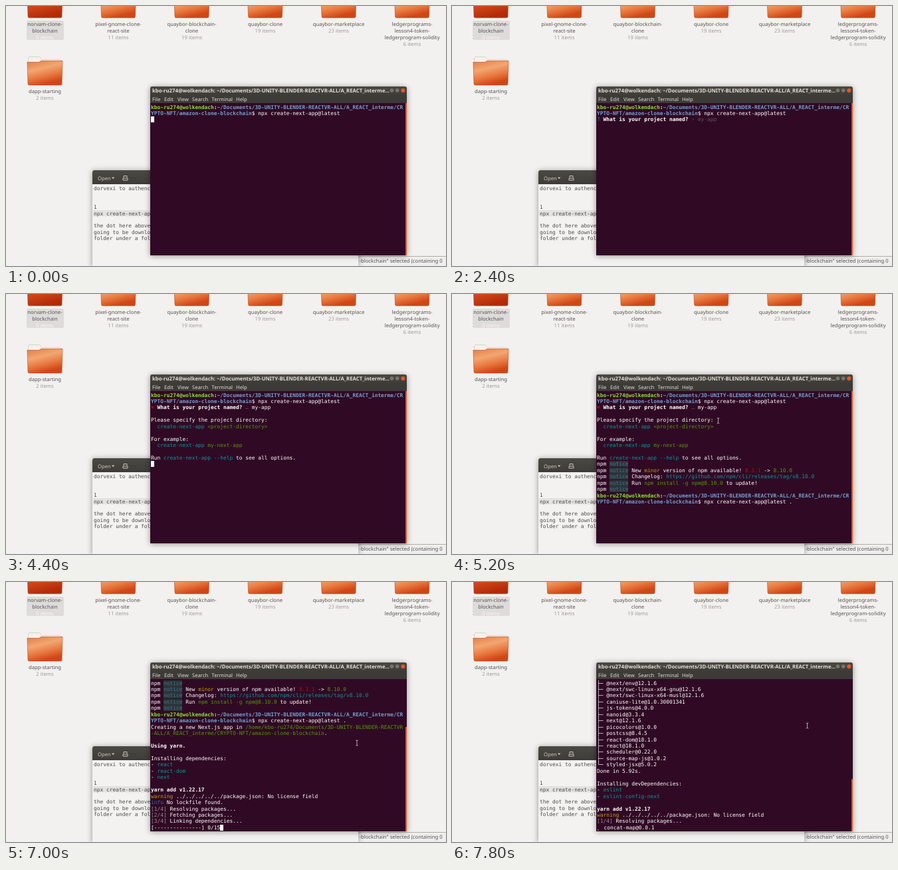
These frames come from a looping animation (662 by 391 pixels, 8000 ms). An HTML page:

```html
<!DOCTYPE html>
<html lang="en">
<head>
<meta charset="utf-8">
<title>Terminal session</title>
<style>
  html, body { margin: 0; width: 100%; height: 100%; overflow: hidden; background: #f2f1ef; }
  svg { position: absolute; left: 0; top: 0; width: 662px; height: 391px; }
  svg, pre { text-rendering: geometricPrecision; }
  text { font: 7.7px "Noto Sans", sans-serif; }
  pre, .mono text { font: 7.89px "DejaVu Sans Mono", monospace; }
  pre { position: absolute; left: 218px; top: 147.5px; margin: 0; line-height: 9.45px; color: #fff; }
  .window { filter: drop-shadow(0 1px 4px #0006); }
  .name { fill: #555552; text-anchor: middle; }
  .count { fill: #9b9b98; text-anchor: middle; }
  .G, .B, .W { font-weight: bold; }
  .G { color: #8ae234; }
  .B { color: #729fcf; }
  .c { color: #06989a; }
  .g { color: #4e9a06; }
  .y { color: #c4a000; }
  .r { color: #cc0000; }
  .b { color: #3465a4; }
  .d { color: #5d5560; }
  .s { color: #9a8f97; }
  .o { background: #2e3436; color: #3478a0; }
  .k { background: #fff; }
  .K { background: #77707a; color: #3a2a38; }
</style>
</head>
<body>
<svg viewBox="0 0 662 391">
  <defs>
    <linearGradient id="orange" x2=".35" y2="1">
      <stop offset="0" stop-color="#e47c40"/><stop offset=".4" stop-color="#f2a673"/><stop offset=".7" stop-color="#e87a40"/><stop offset="1" stop-color="#cf4716"/>
    </linearGradient>
    <linearGradient id="red" x2=".35" y2="1">
      <stop offset="0" stop-color="#d0602c"/><stop offset=".6" stop-color="#cc431a"/><stop offset="1" stop-color="#b42a08"/>
    </linearGradient>
    <linearGradient id="bar" x2="0" y2="1">
      <stop offset="0" stop-color="#4b4943"/><stop offset="1" stop-color="#3d3c38"/>
    </linearGradient>
    <g id="folder">
      <path d="M-25-31V-40.5q0-2 2-2H-8l3 4H23q2 0 2 2v5.5z" fill="#f7f1eb" stroke="#d9c3b3" stroke-width=".7"/>
      <path d="M-26.5-34.5H-9l3-2H26.5L25.5-2q0 2-2 2h-47q-2 0-2-2z" stroke="#b9481a" stroke-width=".6"/>
    </g>
  </defs>
  <rect width="662" height="391" fill="#f2f1ef"/>
  <rect x="31" y="22" width="56" height="29" rx="2" fill="#dddcda"/>
  <g id="desktop"></g>

  <path d="M520 376.5H663V392H520z" fill="#efeeec" stroke="#b0aeaa"/>
  <text x="531.5" y="386.4" fill="#555552">-blockchain" selected (containing 0</text>

  <g class="window">
    <path d="M130 391V250q0-3 3-3H527q3 0 3 3V391z" fill="#f3f2f0"/>
    <path d="M130 268V250q0-3 3-3H527q3 0 3 3v18z" fill="url(#bar)"/>
  </g>
  <text x="138" y="261.5" fill="#c8c3b9">Open</text>
  <path d="M159 257.5h4.4l-2.2 2.8z" fill="#c8c3b9"/>
  <path d="M177 258v-2.5h5V258m-6 1h7v3h-7z" fill="none" stroke="#c8c3b9"/>
  <rect x="131" y="307" width="399" height="9.5" fill="#e3e2df"/>
  <g class="mono" fill="#4c4c4a">
    <text x="132" y="276.7">dorvexi to authenc</text>
    <text x="132" y="305">1</text>
    <text x="132" y="314.5">npx create-next-ap</text>
    <text x="132" y="333.4">the dot here above</text>
    <text x="132" y="342.9">going to be downlo</text>
    <text x="132" y="352.3">folder under a fol</text>
  </g>

  <g class="window">
    <path d="M217 375V125q0-4 4-4H599q4 0 4 4V375z" fill="#300a24"/>
    <path d="M217 146V125q0-4 4-4H599q4 0 4 4v21z" fill="#3c3b37"/>
    <path d="M217 134V125q0-4 4-4H599q4 0 4 4v9z" fill="url(#bar)"/>
  </g>
  <text x="220" y="130.2" fill="#e4dfd6" style="font-size:7.75px;font-weight:bold">kbo-ru274@wolkendach: ~/Documents/3D-UNITY-BLENDER-REACTVR-ALL/A_REACT_interme...</text>
  <circle cx="580.5" cy="127" r="2.8" fill="#77756e"/>
  <circle cx="588.7" cy="127" r="2.8" fill="#77756e"/>
  <circle cx="597.3" cy="127" r="3" fill="#e6572c"/>
  <g fill="#dfdbd2">
    <text x="220" y="143">File</text><text x="238" y="143">Edit</text><text x="258" y="143">View</text>
    <text x="280" y="143">Search</text><text x="309.5" y="143">Terminal</text><text x="346" y="143">Help</text>
  </g>
  <rect id="thumb" x="601" width="2" fill="#d95c30"/>
</svg>
<pre id="screen"></pre>
<svg viewBox="0 0 662 391">
  <path id="pointer" d="M-1.7-4q1.7 0 1.7 1q0-1 1.7-1M0-3V3M-1.7 4q1.7 0 1.7-1q0 1 1.7 1" fill="none" stroke="#d8ced5" stroke-width=".8"/>
</svg>
<script>
const $ = id => document.getElementById(id);
const LOOP = 8000, STEP = 200, ROWS = 24;

// Desktop folders: centre x, icon bottom, item count, label lines
const folders = [
  [58.5, 17.7, 0, 'norvam-clone-', 'blockchain'],
  [169, 17.7, 11, 'pixel-gnome-clone-', 'react-site'],
  [279.5, 17.7, 19, 'quaybor-blockchain-', 'clone'],
  [390, 17.7, 19, 'quaybor-clone'],
  [500.5, 17.7, 23, 'quaybor-marketplace'],
  [611, 17.7, 6, 'ledgerprograms-', 'lesson4-token-', 'ledgerprogram-solidity'],
  [58.5, 119, 2, 'dapp-starting'],
];
$('desktop').innerHTML = folders.map(([x, y, count, ...label], i) => {
  const line = (text, row, attr) => `<text x="${x}" y="${y + 12.4 + row * 9.8}" ${attr}>${text}</text>`;
  return `<use href="#folder" x="${x}" y="${y}" fill="url(#${i ? 'orange' : 'red'})"/>` +
    label.map((text, row) => line(text, row, 'class="name"')).join('') +
    line(count + ' items', label.length, `class="count"${i ? '' : ' style="fill:#fdf3ed"'}`);
}).join('');

// Terminal markup: {style:text}
const cursor = '{k: }';
const prompt = [
  '{G:kbo-ru274@wolkendach}{W::}{B:~/Documents/3D-UNITY-BLENDER-REACTVR-ALL/A_REACT_interme/CR}',
  '{B:YPTO-NFT/amazon-clone-blockchain}$ ',
];
const command = prompt[1] + 'npx create-next-app@latest';
const ask = on => '{c:?} {W:What is your project named?} {d:›} ' + (on ? '{K:m}{d:y-app}' : '{d:my-app}');
const notice = (text = '') => `npm {o:notice} ${text}`;
const stage = (n, text) => `{s:[${n}/4]} ${text}...`;
const spin = (dot, text) => `${dot} ${text}${cursor}`;
const progress = (done, total, width = 15) => {
  const full = Math.round(done / total * width);
  return `[${'#'.repeat(full)}${'-'.repeat(width - full)}] ${done}/${total}${cursor}`;
};
const tree = items => items.map((item, i) => (i < items.length - 1 ? '├─ ' : '└─ ') + item);
const yarnAdd = ['{W:yarn add v1.22.17}', '{y:warning} ../../../../../package.json: No license field'];
const direct = ['next@12.1.6', 'react-dom@18.1.0', 'react@18.1.0'];
const packages = ['@next/env@12.1.6', '@next/swc-linux-x64-gnu@12.1.6', '@next/swc-linux-x64-musl@12.1.6',
  'caniuse-lite@1.0.30001341', 'js-tokens@4.0.0', 'nanoid@3.3.4', 'next@12.1.6', 'picocolors@1.0.0',
  'postcss@8.4.5', 'react-dom@18.1.0', 'react@18.1.0', 'scheduler@0.22.0', 'source-map-js@1.0.2', 'styled-jsx@5.0.2'];

// Output events: time, lines removed from the end, lines added
const events = [
  [0, 0, [prompt[0], command, cursor]],
  [600, 1, ['']],
  [1200, 1, [cursor]],
  ...[1400, 2000, 2600, 3200, 3800].map((ms, i) => [ms, 1, [ask(i % 2 == 0)]]),
  [4200, 1, ['{r:✖} {W:What is your project named?} {d:…} my-app', '',
    'Please specify the project directory:',
    '  {c:create-next-app} {g:&lt;project-directory&gt;}', '',
    'For example:',
    '  {c:create-next-app} {g:my-next-app}', '',
    'Run {c:create-next-app --help} to see all options.', cursor]],
  [4600, 1, [notice(),
    notice('New {y:minor} version of npm available! {r:8.3.1} -&gt; {g:8.10.0}'),
    notice('Changelog: {c:https://github.com/npm/cli/releases/tag/v8.10.0}'),
    notice('Run {g:npm install -g npm@8.10.0} to update!'),
    notice(), prompt[0], prompt[1] + cursor]],
  [5000, 1, [command + cursor]],
  [5200, 1, [command + ' .']],
  [5400, 0, [cursor]],
  [5600, 1, ['Creating a new Next.js app in {g:/home/kbo-ru274/Documents/3D-UNITY-BLENDER-REACTVR}',
    '{g:-ALL/A_REACT_interme/CRYPTO-NFT/amazon-clone-blockchain}.', '',
    '{W:Using yarn.}', '',
    'Installing dependencies:', '- {c:react}', '- {c:react-dom}', '- {c:next}', '', cursor]],
  [5800, 1, [...yarnAdd, '{b:info} No lockfile found.', stage(1, 'Resolving packages'), spin('⠁', 'react@18.1.0')]],
  [6000, 1, [spin('⠂', '@next/swc-win32-x64-msvc@12.1.6')]],
  [6200, 1, [spin('⠄', 'styled-jsx@5.0.2')]],
  [6400, 1, [stage(2, 'Fetching packages'), progress(0, 26)]],
  [6600, 1, [progress(12, 26)]],
  [6800, 1, [progress(24, 26)]],
  [7000, 1, [stage(3, 'Linking dependencies'), progress(0, 15)]],
  [7200, 1, [progress(9, 15)]],
  [7400, 1, [...direct.map(name => `{y:warning} " &gt; ${name}" has unmet peer dependency`),
    stage(4, 'Building fresh packages'), '{g:success} Saved lockfile.', yarnAdd[1],
    '{g:success} Saved 14 new dependencies.',
    '{b:info} Direct dependencies', ...tree(direct),
    '{b:info} All dependencies', ...tree(packages),
    'Done in 5.92s.', cursor]],
  [7600, 1, ['', 'Installing devDependencies:', '- {c:eslint}', '- {c:eslint-config-next}', '',
    ...yarnAdd, stage(1, 'Resolving packages'), '⠁ eslint@8.15.0']],
  [7800, 1, ['⡀ concat-map@0.0.1']],
];

// Pointer path: time, x, y
const path = [[5200, 400.5, 190.5], [6000, 520.5, 306.5], [7000, 528, 242], [7800, 534.5, 216]];

function pointerAt(t) {
  const i = Math.max(1, path.findIndex(p => p[0] >= t));
  const [a, b] = [path[i - 1], path[i]];
  const u = (t - a[0]) / (b[0] - a[0]);
  const ease = u * u * (3 - 2 * u);
  return [1, 2].map(k => a[k] + (b[k] - a[k]) * ease);
}

function render(t) {
  const log = [];
  for (const [ms, drop, lines] of events) {
    if (ms > t) break;
    log.length -= drop;
    log.push(...lines);
  }
  $('screen').innerHTML = log.slice(-ROWS).join('\n').replace(/\{(\w):([^}]*)\}/g, '<span class="$1">$2</span>');

  const height = 229 * Math.min(1, ROWS / log.length);
  $('thumb').setAttribute('y', 375 - height);
  $('thumb').setAttribute('height', height);

  const visible = t >= path[0][0];
  $('pointer').style.display = visible ? '' : 'none';
  if (visible) $('pointer').setAttribute('transform', `translate(${pointerAt(t)})`);
}

const start = performance.now();
let shown = -1;
function tick() {
  const t = Math.floor((performance.now() - start) % LOOP / STEP) * STEP;
  if (t !== shown) render(shown = t);
  requestAnimationFrame(tick);
}
tick();
</script>
</body>
</html>
```
